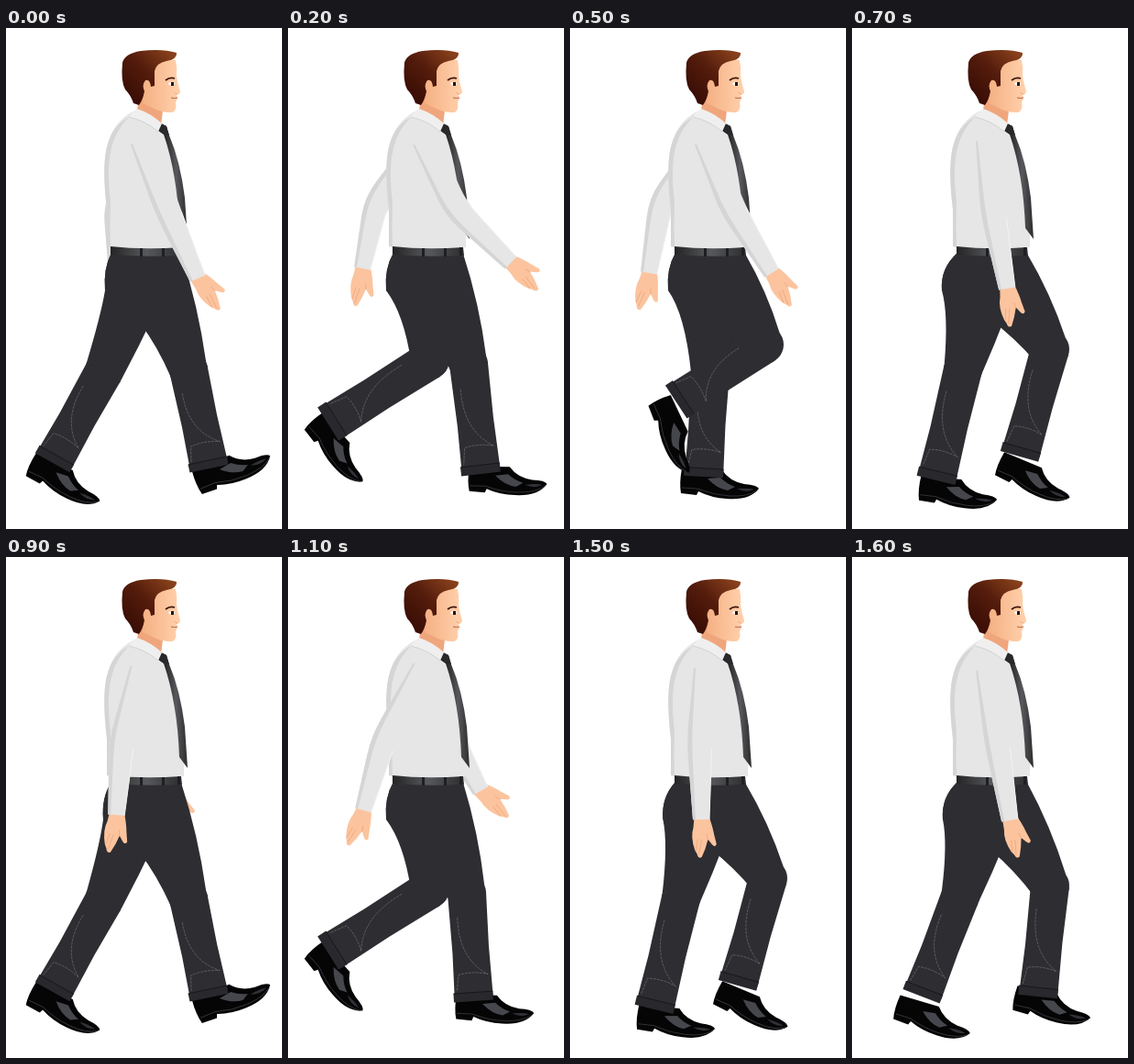
Animation of 301 by 546 pixels, one loop 1.7 s. Source, as an HTML page with a canvas:

```html
<!DOCTYPE html>
<html lang="en">
<head>
<meta charset="utf-8">
<title>Walking man</title>
<style>
html, body { margin: 0; width: 100%; height: 100%; overflow: hidden; background: #fff; }
canvas { display: block; width: 301px; height: 546px; }
</style>
</head>
<body>
<canvas id="stage"></canvas>
<script>
const W = 301, H = 546, STEP = 100, COUNT = 17;
const canvas = document.getElementById('stage');
const ctx = canvas.getContext('2d');
const ratio = window.devicePixelRatio || 1;
canvas.width = W * ratio;
canvas.height = H * ratio;

const SHIRT = '#e6e6e6', FOLD = '#d5d5d6', CLOTH = '#2e2d32', SKIN = '#fbc49e', SKIN_DARK = '#f0a67c';

// Leg poses: knee x,y, cuff x,y, shoe x,y, shoe angle in degrees.
const leg = {
  strike:  [199, 372, 222, 480, 228, 480, -26],
  planted: [197, 366, 211, 486, 222, 485, -2],
  loaded:  [195, 366, 203, 484, 208, 484, -1],
  under:   [153, 375, 146, 489, 146, 488, 0],
  trail:   [121, 372, 92, 493, 99, 497, 3],
  rise:    [118, 370, 76, 479, 74, 491, 14],
  push:    [107, 374, 51, 474, 52, 480, 22],
  lift:    [155, 362, 44, 432, 49, 442, 45],
  pass:    [212, 345, 116, 408, 114, 425, 62],
  passLow: [203, 352, 102, 421, 106, 427, 58],
  reach:   [216, 350, 183, 467, 186, 478, 20],
  extend:  [216, 358, 203, 479, 203, 479, 9]
};
const key = (t, pose) => [t, ...pose];
const nearLeg = [key(0, leg.push), key(2, leg.lift), key(5, leg.pass), key(7, leg.reach), key(8, leg.extend),
  key(9, leg.strike), key(11, leg.loaded), key(13, leg.under), key(15, leg.trail), key(16, leg.rise)];
const farLeg = [key(0, leg.strike), key(2, leg.planted), key(5, leg.under), key(7, leg.trail), key(8, leg.rise),
  key(9, leg.push), key(11, leg.lift), key(13, leg.passLow), key(15, leg.reach), key(16, leg.extend)];

// Arm keys: time, elbow x,y, wrist x,y, hand angle.
const nearArm = [[0, 176, 198, 209, 273, 50], [2, 183, 197, 243, 256, 40], [5, 177, 196, 220, 267, 55],
  [7, 154, 200, 169, 284, 80], [11, 104, 200, 82, 276, 108], [13, 112, 200, 94, 279, 108], [16, 158, 200, 172, 287, 72]];
const farArm = [[0, 120, 198, 120, 255, 88], [2, 96, 190, 81, 262, 95], [5, 99, 190, 86, 267, 100],
  [7, 130, 200, 138, 264, 88], [11, 180, 200, 210, 255, 38], [13, 175, 200, 199, 264, 45], [16, 155, 200, 158, 265, 75]];
const seatTrack = [[0, 108], [2, 107], [5, 107], [7, 98], [9, 106], [11, 107], [13, 109], [16, 99]];

// Smooth cyclic interpolation through unevenly spaced keys.
function sample(keys, t) {
  const n = keys.length;
  const at = i => keys[(i + n) % n];
  const time = i => at(i)[0] + COUNT * Math.floor(i / n);
  let i = n - 1;
  while (keys[i][0] > t) i--;
  const span = time(i + 1) - time(i), u = (t - time(i)) / span;
  return at(i).slice(1).map((a, k) => {
    const b = at(i + 1)[k + 1];
    const m0 = (b - at(i - 1)[k + 1]) / (time(i + 1) - time(i - 1)) * span;
    const m1 = (at(i + 2)[k + 1] - a) / (time(i + 2) - time(i)) * span;
    const u2 = u * u, u3 = u2 * u;
    return a * (2 * u3 - 3 * u2 + 1) + m0 * (u3 - 2 * u2 + u) + b * (3 * u2 - 2 * u3) + m1 * (u3 - u2);
  });
}

function fill(path, style) {
  ctx.fillStyle = style;
  ctx.fill(new Path2D(path));
}
function line(path, style, width = 1) {
  ctx.strokeStyle = style;
  ctx.lineWidth = width;
  ctx.stroke(new Path2D(path));
}
function gradient(x0, y0, x1, y1, ...colors) {
  const g = ctx.createLinearGradient(x0, y0, x1, y1);
  colors.forEach((c, i) => g.addColorStop(i / (colors.length - 1), c));
  return g;
}
function placed(x, y, degrees, draw) {
  ctx.save();
  ctx.translate(x, y);
  ctx.rotate(degrees * Math.PI / 180);
  draw();
  ctx.restore();
}
// Returns a mapper from (share of the way a to b, offset to the right) to "x,y".
function along(ax, ay, bx, by) {
  const d = Math.hypot(bx - ax, by - ay), nx = (by - ay) / d, ny = (ax - bx) / d;
  return (u, v) => [ax + (bx - ax) * u + nx * v, ay + (by - ay) * u + ny * v];
}

function shoe() {
  fill('M-24,-8 Q-27,8 -25,19 L-8,21 L-6,17 Q8,24 25,25 Q50,27 60,14 Q58,10 44,9 Q28,6 20,-6 Z', '#050506');
  fill('M4,3 L18,2 Q25,9 34,12 L26,16 Q14,14 4,3Z', '#45474d');
  fill('M36,14 Q48,13 55,15 Q46,19 36,14Z', '#303238');
  line('M-24,13 L-7,14 Q10,21 28,22 Q48,23 58,16', '#3c3c42', .8);
}

function drawLeg([kx, ky, cx, cy, sx, sy, angle], seat) {
  placed(sx, sy, angle, shoe);
  const thigh = along(150, 265, kx, ky), shin = along(kx, ky, cx, cy);
  const back = thigh(1, -21), front = thigh(1, 21);
  const bend = (seat + back[0]) / 2 + 6;
  fill(`M115,245 Q${seat - 2},262 ${seat},286 Q${bend},312 ${back} L${front}
    Q${(193 + front[0]) / 2 + 4},${(250 + front[1]) / 2 - 4} 191,246Z`, CLOTH);
  ctx.beginPath();
  ctx.arc(kx, ky, 21, 0, 7);
  ctx.fill();
  fill(`M${shin(0, -21)} L${shin(.55, -20)} L${shin(.96, -21)} L${shin(.96, 21)} L${shin(.5, 20)} L${shin(0, 21)}Z`, CLOTH);
  fill(`M${shin(.92, -22)} L${shin(1, -22)} L${shin(1, 21)} L${shin(.92, 21)}Z`, '#29282d');
  line(`M${shin(.92, -22)} L${shin(.92, 21)}`, '#17171a');
  ctx.setLineDash([3, 1]);
  line(`M${shin(.22, -12)} Q${shin(.6, -14)} ${shin(.76, 17)} Q${shin(.72, 0)} ${shin(.75, -15)} L${shin(.9, -18)}`,
    'rgba(165,165,172,.55)', .7);
  ctx.setLineDash([]);
}

function hand() {
  fill('M-5,-8 Q8,-12 17,-13 L28,-15 Q32,-13 28,-10 L22,-6 Q32,-3 41,2 Q43,6 37,7 L33,9 Q18,13 8,9 L-5,7Z', SKIN);
  line('M22,1 L38,5 M21,5 L34,8 M16,-5 L23,-6', SKIN_DARK, .8);
}

function drawArm([ex, ey, wx, wy, angle]) {
  placed(wx, wy, angle, hand);
  const upper = along(148, 122, ex, ey), lower = along(ex, ey, wx, wy);
  const mid = v => {
    const a = upper(1, v), b = lower(0, v);
    return [(a[0] + b[0]) / 2, (a[1] + b[1]) / 2];
  };
  const edge = (shoulder, elbow, wrist) => [upper(0, shoulder), upper(.55, (shoulder + elbow) / 2), mid(elbow), lower(.5, (elbow + wrist) / 2), lower(1, wrist)];
  const curve = ([a, b, c, d, e]) => `${a} Q${b} ${mean(b, c)} Q${c} ${mean(c, d)} L${e}`;
  const mean = (p, q) => [(p[0] + q[0]) / 2, (p[1] + q[1]) / 2];
  const reverse = p => curve([...p].reverse());
  const left = edge(-13, -14, -9), inner = edge(-11, -8.5, -6), right = edge(15, 14, 9);
  fill(`M${curve(left)} L${reverse(right)} Q148,112 ${left[0]}Z`, SHIRT);
  fill(`M${curve(left)} L${reverse(inner)}Z`, FOLD);
  line(`M${lower(.1, 13)} L${lower(1, 9)}`, '#f3f3f3', 1);
}

function drawTorso() {
  fill('M138,91 Q117,103 111,126 Q104,148 110,198 L110,238 Q150,243 194,239 Q196,170 176,112 L168,104Z', SHIRT);
  fill('M134,97 Q117,106 111,126 Q104,148 110,198 L110,238 L114,239 Q113,215 114,190 Q109,150 116,127 Q121,110 134,97Z', FOLD);
  fill('M114,238 Q150,242 191,239 L192,248 Q150,250 114,247Z', gradient(114, 0, 192, 0, '#242426', '#58595c', '#2c2c2e'));
  fill('M146,240 h3 v9 h-3Z M170,240 h3 v9 h-3Z M187,239 h3 v9 h-3Z', '#1d1f24');
  fill('M167,103 L175,107 L178,117 Q190,145 195,185 L198,230 L189,218 Q187,160 172,116 L165,111Z',
    gradient(172, 0, 199, 0, '#232325', '#57585b', '#29292b'));
  fill('M167,103 L175,107 L178,117 L172,116 L165,111Z', '#29292c');
}

function drawHead() {
  fill('M146,70 L143,89 Q156,93 169,106 L171,90Z', SKIN_DARK);
  fill('M160,37 Q175,32 185,35 Q187,44 186,52 Q187,60 190,69 Q190,72 186,73 L187,77 L185,81 Q187,90 181,92 Q168,92 160,87 L149,82 L150,58Z',
    gradient(150, 0, 186, 0, '#f5b184', '#ffcea9'));
  fill('M127,38 Q129,28 147,25 Q170,22 186,27 Q187,34 175,36 Q164,38 162,47 L162,63 L158,64 Q157,55 152,57 Q148,62 151,69 Q149,79 145,84 L139,82 Q136,73 130,67 Q125,58 127,38Z',
    gradient(132, 70, 176, 24, '#3b0e05', '#541c0c', '#87401b'));
  line('M174,57 Q179,53 184,55', '#3b160b', 1.7);
  fill('M177,60 Q181,58 184,60 L183,63 L178,62Z', '#fff');
  fill('M180,59 h3 v4 h-3Z', '#25140f');
  line('M180,76 Q184,77 187,76', '#b9604a', 1);
  line('M183,70 Q185,72 187,72', SKIN_DARK, .9);
  fill('M143,88 Q158,93 170,104 L166,113 Q152,101 134,97 Q137,91 143,88Z', '#efefef');
  line('M134,97 Q152,101 166,113', '#d0d0d1', .9);
}

function render(now) {
  const t = Math.floor(now / STEP) % COUNT;
  const [seat] = sample(seatTrack, t);
  ctx.setTransform(ratio, 0, 0, ratio, 0, 0);
  ctx.fillStyle = '#fff';
  ctx.fillRect(0, 0, W, H);
  drawArm(sample(farArm, t));
  drawLeg(sample(farLeg, t), seat);
  drawLeg(sample(nearLeg, t), seat);
  drawTorso();
  drawHead();
  drawArm(sample(nearArm, t));
}

let start;
function tick(now) {
  start ??= now;
  render(now - start);
  requestAnimationFrame(tick);
}
render(0);
requestAnimationFrame(tick);
</script>
</body>
</html>
```
